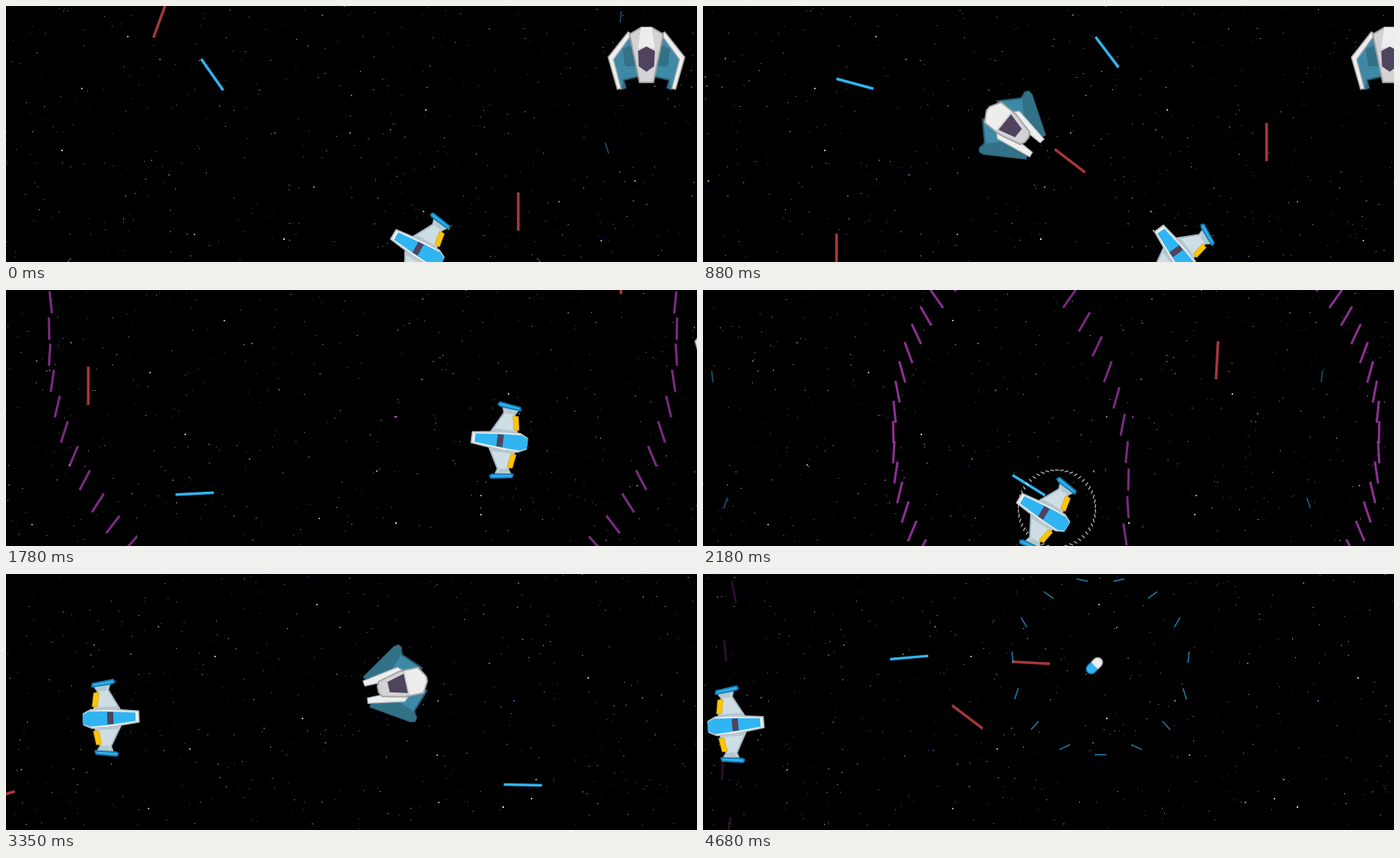
Animation of 902 by 335 pixels, one loop 4700 ms. Source, as an HTML page with a canvas:

```html
<!DOCTYPE html>
<html lang="en">
<head>
<meta charset="utf-8">
<title>Space battle</title>
<style>
  html, body { margin: 0; height: 100%; overflow: hidden; background: #000; }
  canvas { display: block; }
</style>
</head>
<body>
<canvas id="stage" width="902" height="335"></canvas>
<script>
const W = 902, H = 335, LOOP = 4700, DEG = Math.PI / 180;
const ctx = document.getElementById('stage').getContext('2d');

const BLUE = '#30b5f2', RED = '#a8373c', PURPLE = '#be41c8';
const TEAL = '#3d89a6', DARK_TEAL = '#327186', WINDOW = '#50435e';

// Way points: [time, x, y, heading in degrees]
const POSES = [[0, 537, 317, 210], [880, 617, 320, 233], [1390, 693, 183, 177],
  [2180, 444, 291, 211], [2840, 146, 270, 361], [3890, 131, 266, 356], [4680, 43, 197, 355]];
const FIRING = [[-270, 424, 311, 235], [400, 662, 226, 195], [580, 708, 300, 233],
  [1205, 694, 243, 177], [2145, 455, 274, 212], [2715, 156, 267, 361],
  [3570, 133, 124, 354], [4454, 44, 129, 355]];
const PLAYER = [...POSES, ...FIRING].sort((a, b) => a[0] - b[0]);
const HUNTERS = [
  [[300, 440, -90, 5], [880, 404, 160, 39], [1390, 358, 9, 30], [1700, 335, -90, 28]],
  [[1100, 325, 430, -35], [1390, 338, 349, -20], [1750, 345, 430, -10]],
  [[2350, 495, -70, 160], [2840, 507, 177, 165], [3600, 510, 118, 170], [3890, 510, 211, 172], [4600, 511, 120, 183]]
];
const STRAYS = [[0, 201, 18, 290], [2180, 671, 92, 93], [2840, 491, 310, 147], [4680, 345, 187, 217]];

// Ring bursts: [time, x, y]
const RINGS = [
  { color: PURPLE, count: 75, length: 29, width: 3, alpha: 1, bursts: [[1263, 466, 59],
    [1770, 125, 257], [1878, 565.5, 192.5], [3401, 272, 142], [3796, 952, 197]] },
  { color: BLUE, count: 15, length: 15, width: 1.5, alpha: .78, bursts: [[-396, 389, 57.5],
    [1799, 410, 155], [4570, 519, 121]] },
  { color: '#fff', count: 50, length: 5, width: 1.3, alpha: .75, bursts: [[2132, 462, 286]] }
];

let seed = 7;
const random = () => (seed = seed * 16807 % 2147483647) / 2147483647;
const STARS = Array.from({ length: 460 }, () => ({
  x: random() * W, y: random() * H,
  depth: .5 + random(),
  size: random() < .08 ? 2 : 1,
  alpha: .25 + .6 * random() ** 2,
  color: random() < .7 ? '#fff' : ['#55f', '#94f', '#9cf', '#5da', '#d6f'][Math.floor(random() * 5)]
}));

// The picture is held about 130 ms at a time, in equal parts between poses.
function hold(now) {
  const i = POSES.findLastIndex(pose => pose[0] <= now);
  if (i === POSES.length - 1) return POSES[i][0];
  const start = POSES[i][0], span = POSES[i + 1][0] - start;
  const step = span / Math.round(span / 140);
  return start + Math.floor((now - start) / step) * step;
}

// Smooth interpolation that never overshoots a way point.
function sample(path, t) {
  const last = path.length - 1;
  if (t >= path[last][0]) return path[last].slice(1);
  const i = Math.max(0, path.findIndex(k => k[0] > t) - 1);
  const rate = (j, c) => (path[j + 1][c] - path[j][c]) / (path[j + 1][0] - path[j][0]);
  const slope = (j, c) => {
    if (j === 0) return rate(0, c);
    if (j === last) return rate(last - 1, c);
    const a = rate(j - 1, c), b = rate(j, c);
    return a * b > 0 ? 2 * a * b / (a + b) : 0;
  };
  const span = path[i + 1][0] - path[i][0], u = (t - path[i][0]) / span, v = 1 - u;
  return [1, 2, 3].map(c =>
    path[i][c] * v * v * (1 + 2 * u) + path[i + 1][c] * u * u * (3 - 2 * u) +
    span * u * v * (slope(i, c) * v - slope(i + 1, c) * u));
}

const alive = (path, t) => t >= path[0][0] && t < path[path.length - 1][0];

function at(x, y, degrees, draw) {
  ctx.save();
  ctx.translate(x, y);
  ctx.rotate(degrees * DEG);
  draw();
  ctx.restore();
}

function shape(points, fill, stroke, width = 2) {
  ctx.beginPath();
  for (let i = 0; i < points.length; i += 2) ctx.lineTo(points[i], points[i + 1]);
  ctx.closePath();
  ctx.lineJoin = 'round';
  ctx.fillStyle = fill;
  ctx.fill();
  if (stroke) {
    ctx.strokeStyle = stroke;
    ctx.lineWidth = width;
    ctx.stroke();
  }
}

// Closes a half outline by mirroring it across the ship's axis.
function hull(half, ...style) {
  const points = [...half];
  for (let i = half.length - 2; i >= 0; i -= 2) points.push(half[i], -half[i + 1]);
  shape(points, ...style);
}

function pair(draw) {
  for (const side of [1, -1]) {
    ctx.save();
    ctx.scale(1, side);
    draw();
    ctx.restore();
  }
}

function drawPlayer() {
  pair(() => {
    shape([-20, 42, 0, 43, -2, 37, 12, 11, -22, 11, -16, 36], '#cfdee5', '#a3b7c1');
    shape([-19, 41, -3, 42, -5, 36, -15, 36], '#b4c8d1');
    shape([-21, 34, -14, 34, -17, 16, -24, 16], '#fcc507', '#dba508', .7);
    shape([-23, 42, -22, 46, 5, 50, 7, 47, 4, 45], BLUE, '#1580b8');
    shape([-22, 15, 10, 15, 12, 11, -22, 11], '#b4c8d1');
  });
  hull([-36, 7, -26, 12, -5, 12, 36, 7], '#f3f4f6', '#bfc4ca');
  hull([-37, 6, -28, 10, -5, 9, 32, 5.5], BLUE);
  hull([-5, 8, 3, 8], WINDOW);
}

function drawHunter() {
  pair(() => {
    shape([39, 20, -8, 50, -14, 51, -17, 47, -16, 38, -38, 15, 0, 8], TEAL, '#28596b');
    shape([39, 20, -8, 50, -14, 51, -17, 47, -13, 36, 0, 23, 38, 16], DARK_TEAL);
    shape([41, 15, 40, 8, 12, 8, -12, 18, -7, 23], '#eee', '#a9b1b4', 1.2);
  });
  hull([-41, 3, -33, 17, -8, 17, 21, 10, 24, 4], '#d3d3d5', '#a5a5a8');
  hull([-40, 3, -32, 16, -15, 16], '#ededed');
  hull([-13, 13, 10, 7], WINDOW);
}

function drawGuard() {
  pair(() => {
    shape([-30, 20, 2, 44, 41, 33, 39, 27, 29, 30, 24, 9, -20, 12], TEAL, '#28596b');
    shape([-18, 16, -12, 31, 11, 28, 11, 14], DARK_TEAL);
    shape([29, 30, 41, 33, 39, 27], DARK_TEAL);
    shape([-34, 24, -1, 50, 41, 38, 40, 33, 2, 43, -31, 19], '#eee', '#a0a4a6', 1.5);
  });
  hull([-40, 7, -31, 22, 32, 9], '#d3d3d5', '#a0a0a2');
  hull([-40, 7, -12, 11, -15, 0], '#ededed');
  hull([-15, 0, -9, 11, 11, 10, 18, 0], WINDOW);
}

function drawPill() {
  for (const [radius, left, right] of [[7, '#1580b8', '#aaa'], [5.5, BLUE, '#eee']]) {
    for (const [side, color] of [[-1, left], [1, right]]) {
      ctx.fillStyle = color;
      ctx.beginPath();
      ctx.arc(side * 6, 0, radius, 0, 2 * Math.PI);
      ctx.rect(side < 0 ? -6 : 0, -radius, 6, 2 * radius);
      ctx.fill();
    }
  }
}

function drawStars(t) {
  for (const star of STARS) {
    ctx.globalAlpha = star.alpha;
    ctx.fillStyle = star.color;
    ctx.fillRect(Math.floor((star.x + t * .068 * star.depth) % W), Math.floor(star.y), star.size, star.size);
  }
  ctx.globalAlpha = 1;
}

// Shots fly straight on at 1 px per ms.
function drawShot(color, age, x, y, heading) {
  if (age < 0) return;
  ctx.fillStyle = color;
  at(x, y, heading, () => ctx.fillRect(age - 25, -1.75, 50, 3.5));
}

function drawShots(t) {
  for (const [time, ...pose] of FIRING) drawShot(BLUE, t - time, ...pose);
  for (const [time, ...pose] of STRAYS) drawShot(RED, t - time, ...pose);
  for (let time = 793; time <= t; time += 951) {
    for (const path of HUNTERS) {
      if (alive(path, time)) drawShot(RED, t - time, ...sample(path, time));
    }
  }
  // Two guards above the stage drift apart and fire straight down.
  for (let time = -294; time <= t; time += 971) {
    drawShot(RED, t - time, 689 + .069 * time, -25, 90);
    drawShot(RED, t - time + 145, 221 - .069 * time, -25, 90);
  }
}

function drawRing({ color, count, length, width, alpha }, age, x, y) {
  const radius = age * 1.05;
  if (age < 0 || radius > 1200) return;
  ctx.globalAlpha = alpha * (1 - radius / 1200);
  ctx.fillStyle = color;
  for (let i = 0; i < count; i++) {
    const angle = i * 360 / count;
    at(x + radius * Math.sin(angle * DEG), y + radius * Math.cos(angle * DEG), angle,
      () => ctx.fillRect(-length / 2, -width / 2, length, width));
  }
  ctx.globalAlpha = 1;
}

function render(t) {
  ctx.fillStyle = '#000';
  ctx.fillRect(0, 0, W, H);
  drawStars(t);
  drawShots(t);
  at(836 + t * .0686, 68, 90, drawGuard);
  for (const path of HUNTERS) {
    if (alive(path, t)) at(...sample(path, t), drawHunter);
  }
  if (t >= 4600) at(511, 120, -45, drawPill);
  for (const ring of RINGS) {
    for (const [time, x, y] of ring.bursts) drawRing(ring, t - time, x, y);
  }
  at(...sample(PLAYER, t), drawPlayer);
}

function tick() {
  render(hold(performance.now() % LOOP));
  requestAnimationFrame(tick);
}
tick();
</script>
</body>
</html>
```
